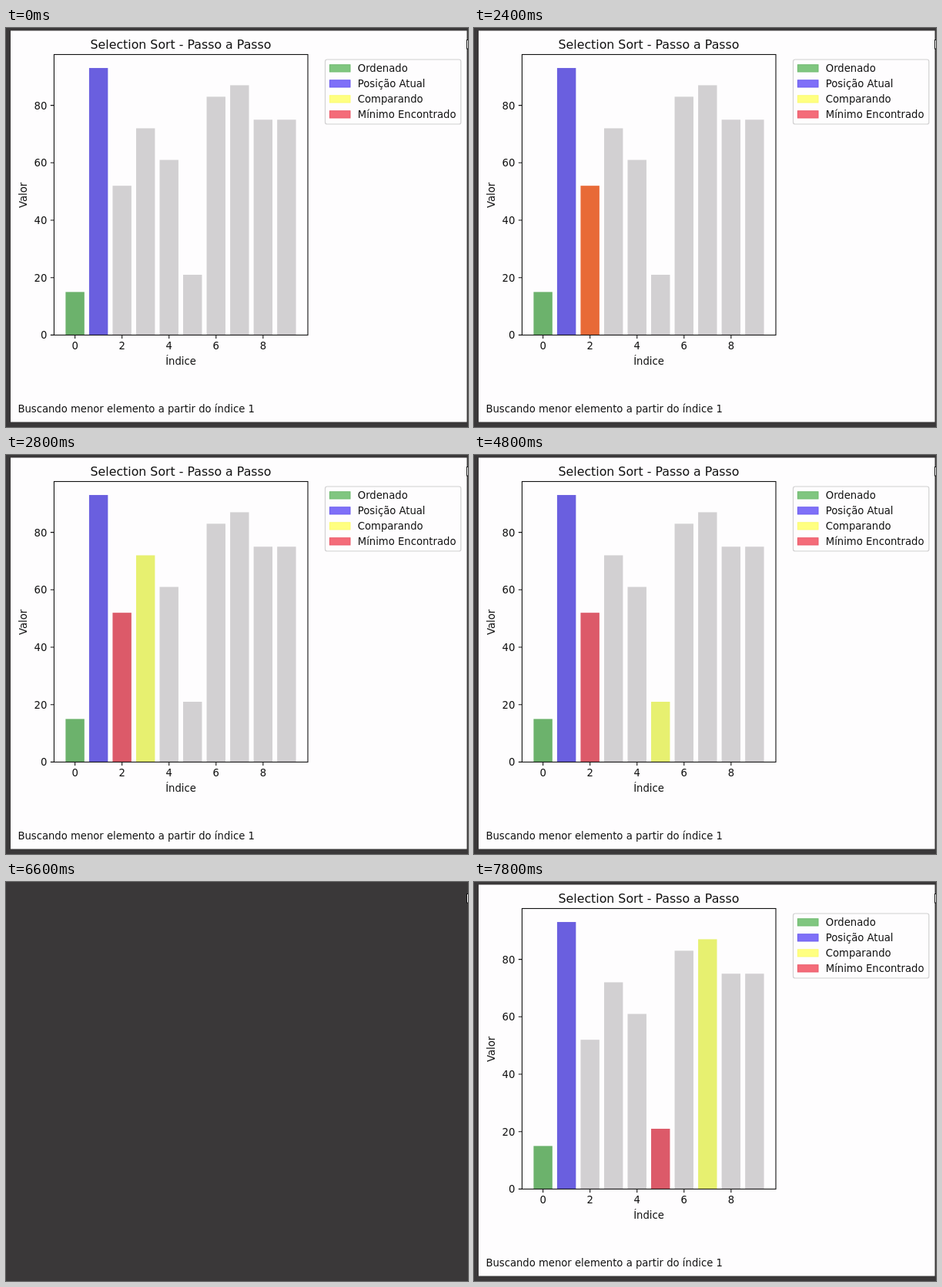
These frames come from a looping animation (600 by 519 pixels, 8000 ms). An HTML page:

```html
<!DOCTYPE html>
<html lang="pt">
<head>
<meta charset="utf-8">
<title>Selection Sort</title>
<style>
  html, body { margin: 0; width: 100%; height: 100%; overflow: hidden; background: #3a3839; }
  svg { display: block; width: 600px; height: 519px; }
  text { font: 13.2px "DejaVu Sans", sans-serif; fill: #111; }
  .title { font-size: 15.8px; }
  .mid { text-anchor: middle; }
  .end { text-anchor: end; }
  .line { fill: none; stroke: #111; stroke-width: 1.1; }

  :root {
    --rest: #d2d0d2; --sorted: #6cb26c; --current: #6a5fdf;
    --compare: #e7f070; --found: #e86a37; --min: #dc5a69;
  }
  .bar { fill: var(--rest); }
  #bar0 { fill: var(--sorted); }
  #bar1 { fill: var(--current); }
  #chart, .bar { animation: 8s step-end infinite; }
  #chart { animation-name: redraw; }
  #bar2 { animation-name: b2; }
  #bar3 { animation-name: b3; }
  #bar4 { animation-name: b4; }
  #bar5 { animation-name: b5; }
  #bar6 { animation-name: b6; }
  #bar7 { animation-name: b7; }

  /* the canvas is briefly cleared before two of the redraws */
  @keyframes redraw {
    0%, 35%, 85%, 100% { opacity: 1; }
    32.5%, 82.5% { opacity: 0; }
  }
  @keyframes b2 {
    0%, 72.5%, 100% { fill: var(--rest); }
    7.5% { fill: var(--compare); }
    20% { fill: var(--found); }
    32.5% { fill: var(--min); }
  }
  @keyframes b3 {
    0%, 47.5%, 100% { fill: var(--rest); }
    32.5% { fill: var(--compare); }
  }
  @keyframes b4 {
    0%, 60%, 100% { fill: var(--rest); }
    47.5% { fill: var(--compare); }
  }
  @keyframes b5 {
    0% { fill: var(--rest); }
    60% { fill: var(--compare); }
    72.5% { fill: var(--found); }
    82.5%, 100% { fill: var(--min); }
  }
  @keyframes b6 {
    0%, 95%, 100% { fill: var(--rest); }
    82.5% { fill: var(--compare); }
  }
  @keyframes b7 {
    0% { fill: var(--rest); }
    95%, 100% { fill: var(--compare); }
  }
</style>
</head>
<body>
<svg viewBox="0 0 600 519">
  <rect width="600" height="519" fill="#3a3839"/>
  <g id="chart">
    <rect x="6" y="3.5" width="592.5" height="509" fill="#fefdfe"/>
    <text class="title mid" x="227" y="27">Selection Sort - Passo a Passo</text>
    <g id="bars"></g>
    <rect class="line" x="62.4" y="34.5" width="329.6" height="364.9"/>
    <g id="ticks"></g>
    <text class="mid" x="227" y="437.5">Índice</text>
    <text class="mid" transform="translate(27 217.5) rotate(-90)">Valor</text>
    <rect x="414.5" y="41" width="176.3" height="84" rx="2.6" fill="#fefdfe" stroke="#d2d1d2" stroke-width="1.2"/>
    <g id="legend"></g>
    <text x="15.4" y="500">Buscando menor elemento a partir do índice 1</text>
  </g>
  <rect x="598.5" y="15.5" width="3" height="11.5" fill="#fff" stroke="#111"/>
</svg>
<script>
  const values = [15, 93, 52, 72, 61, 21, 83, 87, 75, 75];
  const entries = [
    ["Ordenado", "#80c680", "#6cba6c"],
    ["Posição Atual", "#7f70f8", "#6a5bee"],
    ["Comparando", "#ffff80", "#fbfb70"],
    ["Mínimo Encontrado", "#f46c79", "#ea5868"]
  ];
  const base = 399.4, step = 30.53, width = step * 0.8;
  const xAt = i => 89.6 + i * step;
  const yAt = v => base - v * 3.735;
  const fill = (id, items, draw) => {
    document.getElementById(id).innerHTML = items.map(draw).join("");
  };

  fill("bars", values, (v, i) =>
    `<rect class="bar" id="bar${i}" x="${xAt(i) - width / 2}" y="${yAt(v)}" width="${width}" height="${base - yAt(v)}"/>`);

  fill("ticks", [0, 1, 2, 3, 4], n => {
    const x = xAt(n * 2), y = yAt(n * 20);
    return `<path class="line" d="M${x} ${base}v4.6M62.4 ${y}h-4.6"/>
      <text class="mid" x="${x}" y="418.2">${n * 2}</text>
      <text class="end" x="53.4" y="${y + 5}">${n * 20}</text>`;
  });

  fill("legend", entries, ([label, color, edge], i) =>
    `<rect x="420.4" y="${47.8 + i * 20}" width="26.6" height="9.2" fill="${color}" stroke="${edge}"/>
     <text x="456.8" y="${57 + i * 20}">${label}</text>`);
</script>
</body>
</html>
```
